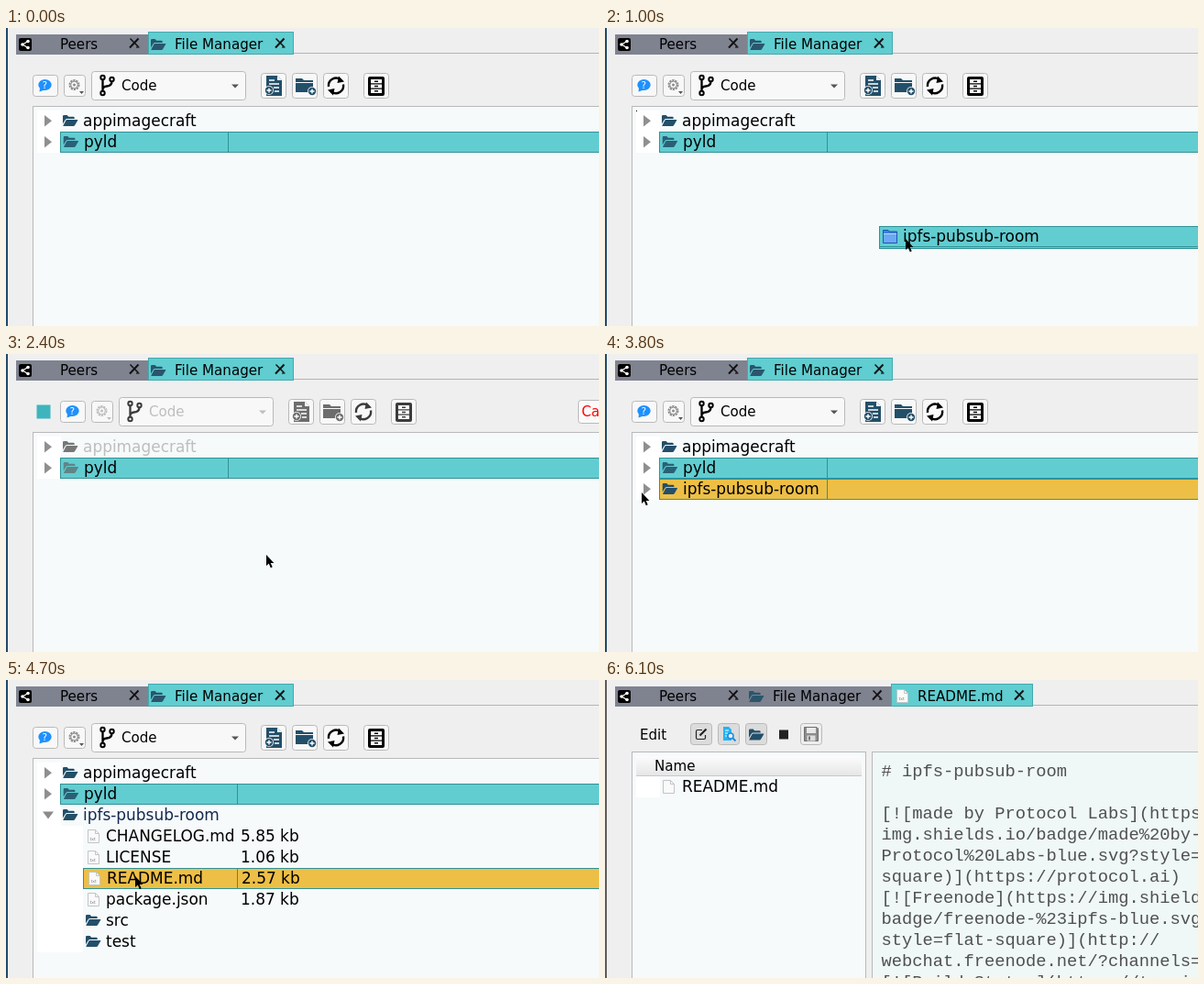
Animation of 647 by 325 pixels, one loop 7100 ms. Source, as an HTML page:

```html
<!DOCTYPE html>
<html lang="en">
<head>
<meta charset="utf-8">
<title>File manager</title>
<style>
html, body { margin: 0; width: 100%; height: 100%; overflow: hidden; background: #efefef; }
svg { display: block; width: 647px; height: 325px; }
text { font-family: "DejaVu Sans", sans-serif; white-space: pre; }
.mono { font-family: "Liberation Mono", monospace; }
</style>
</head>
<body>
<svg id="stage" viewBox="0 0 647 325"></svg>
<script>
const LOOP = 7100;
const TEAL = '#62cdd1', EDGE = '#2f9297', NAVY = '#234f69', GOLD = '#eebf46';
const FRAME = '#b9b9b9', DIM = '#bebebe', PANEL = '#f6fafb', PAPER = '#eff7f7';
const ROW = 16.95, UI = 15.1;

// Hard steps: [start, x, y]
const DRAG = [[400, 585, 310], [500, 535, 300], [600, 485, 286], [700, 435, 270], [800, 385, 252],
  [900, 338, 233], [1000, 299, 216], [1100, 273, 206], [1200, 260, 205], [1300, 255, 205]];
const POINTER = [[1500, 284, 219], [3300, 264, 192], [3500, 190, 178], [3600, 105, 162], [3700, 56, 153],
  [3800, 40, 151], [4200, 44, 150], [4400, 92, 171], [4500, 126, 192], [4700, 141, 214]];
const HOVER = [[0, ''], [3600, 'room'], [4400, 'CHANGELOG.md'], [4500, 'LICENSE'], [4700, 'README.md']];
const SPIN = [[0, 0], [1700, 15], [1800, 30], [1900, 45], [2100, 60], [2200, 75], [2400, 90],
  [5300, 15], [5600, 30], [5800, 45]];
const FILES = [['CHANGELOG.md', '5.85 kb'], ['LICENSE', '1.06 kb'], ['README.md', '2.57 kb'],
  ['package.json', '1.87 kb'], ['src'], ['test']];
const SOURCE = ['# ipfs-pubsub-room', '', '[![made by Protocol Labs](https://',
  'img.shields.io/badge/made%20by-', 'Protocol%20Labs-blue.svg?style=flat-', 'square)](https://protocol.ai)',
  '[![Freenode](https://img.shields.io/', 'badge/freenode-%23ipfs-blue.svg?',
  'style=flat-square)](http://', 'webchat.freenode.net/?channels=', '[![Build Status](https://travis'];

const at = (steps, t) => steps.filter(s => s[0] <= t).pop();
const rect = (x, y, w, h, fill, more = '') => `<rect x="${x}" y="${y}" width="${w}" height="${h}" fill="${fill}" ${more}/>`;
const box = (x, y, w, h, fill, line = FRAME, r = 0) => rect(x + .5, y + .5, w - 1, h - 1, fill, `stroke="${line}" rx="${r}"`);
const path = (d, fill, more = '') => `<path d="${d}" fill="${fill}" ${more}/>`;
const line = (d, color, w = 1) => path(d, 'none', `stroke="${color}" stroke-width="${w}"`);
const disc = (x, y, r, fill) => `<circle cx="${x}" cy="${y}" r="${r}" fill="${fill}"/>`;
const text = (x, y, s, size = ROW, fill = '#000', cls = '') =>
  `<text x="${x}" y="${y}" font-size="${size}" fill="${fill}" class="${cls}">${s}</text>`;
const move = (x, y, s) => `<g transform="translate(${x} ${y})">${s}</g>`;
const button = (x, y, w, h, icon, fill = '#f8f8f8') => box(x, y, w, h, fill, FRAME, 3) + move(x, y, icon);

const folder = (x, y, c = NAVY) => move(x, y,
  path('M0 9.5V1.2Q0 0 1.2 0H4.6L6.2 1.7H11.5Q12.7 1.7 12.7 2.9V4H4.6Q3.3 4 2.6 5.2Z', c) +
  path('M4.7 5H16Q16.6 5 16.2 5.8L13 11.2Q12.6 12 11.6 12H.8Q0 12 .5 11.2L3.4 5.8Q3.8 5 4.7 5Z', c));
const page = (x, y, small = true) => move(x, y,
  path('M.5.5H8.5L12.5 4.5V14.5H.5Z', '#fafafa', 'stroke="#c4c4c4"') + line('M8.5 .5V4.5H12.5', '#c4c4c4') +
  (small ? text(2.5, 12, 'txt', 4.5, '#777') : ''));
const closer = x => line(`M${x + 4.5} 11.5L${x - 5} 21.5`, '#111', 2) + line(`M${x - 4.5} 11.5L${x + 4.5} 20.5`, '#111', 1.5) +
  line(`M${x + 2} 21H${x + 5.5}`, '#111', 1.2);
const plus = (x, y, c) => disc(x, y, 5, '#f8f8f8') + disc(x, y, 4.2, c) +
  line(`M${x - 2.6} ${y}H${x + 2.6}M${x} ${y - 2.6}V${y + 2.6}`, '#fff', 1.4);
const arrow = (x, y) => path(`M${x} ${y}v12l2.8-2.4 2 4.6 1.9-.9-2-4.3h3.7z`, '#000');
const spinner = (y, t) => rect(33.5, y - 7.5, 15, 15, '#3fb4bd', `transform="rotate(${at(SPIN, t)[1]} 41 ${y})"`);

const shareIcon = rect(14, 11, 14, 14, '#000', 'rx="2"') + line('M24 14.5L18 18L24 21.5', '#fff', 1.2) +
  disc(24, 14.5, 1.8, '#fff') + disc(18, 18, 1.8, '#fff') + disc(24, 21.5, 1.8, '#fff');

function tab(x, end, label, tx, icon, active) {
  return (active ? box(x, 4, end - x, 25, '#60cdd0', '#45a9ad') : rect(x, 7, end - x, 22, '#7f8390')) +
    icon + text(tx, 23, label, UI) + closer(end - 15);
}

// Labels sit one pixel further left once the document has loaded.
function tabs(editor, loaded) {
  const dx = loaded ? -1 : 0, mid = 314 + 2 * dx;
  return line(`M${editor ? 467 : 314} 27.5H647`, '#b4b4b4') +
    tab(11, 155, 'Peers', 59, shareIcon, false) +
    tab(155, mid, 'File Manager', 184 + dx, folder(158 + dx, 12, '#2a566d'), !editor) +
    (editor ? tab(mid, 467, 'README.md', 342 + dx, page(319 + dx, 10), true) : '');
}

function toolbar(busy) {
  const c = busy ? '#6d6d6d' : NAVY, ink = busy ? '#3c3c3c' : '#000', soft = busy ? DIM : '#000';
  const cog = busy ? DIM : '#8c8c8c';
  const help = `<ellipse cx="13.5" cy="11" rx="7.2" ry="6" fill="#1e90ff"/>` + path('M8 14L7.5 18.5 13 16.5Z', '#1e90ff') +
    text(10.6, 15, '?', 10.5, '#fff');
  const gear = `<circle cx="11.5" cy="11" r="5" fill="none" stroke="${cog}" stroke-width="2" stroke-dasharray="2.2 .9"/>` +
    `<circle cx="11.5" cy="11" r="3.8" fill="none" stroke="${cog}"/>` +
    disc(11.5, 11, 1.5, cog) + path('M17 18h5l-2.5 3z', busy ? DIM : '#555');
  const branch = line('M12.5 9V22M22.5 11Q22.5 16 17 16.5Q12.5 17 12.5 20', ink, 2.3) +
    [[12.5, 7], [22.5, 9], [12.5, 24]].map(([x, y]) => disc(x, y, 3.2, ink) + disc(x, y, 1.2, '#f8f8f8')).join('');
  const combo = branch + text(33, 21, 'Code', UI, soft) + path('M153 14.5h8l-4 4z', busy ? DIM : '#555');
  const newFile = path('M6 3H18L23 8V25H6Z', c) + path('M18 3V8H23Z', '#f8f8f8') +
    line('M9 8H15M9 12H20M14 16H20M15 20H20', '#fff', 1.5) + plus(9, 19, c);
  const newFolder = path('M4 6H11L13 8H23V21H4Z', c) + line('M4 10.5H23', '#f8f8f8', 1) + plus(22, 20, c);
  const refresh = line('M6 15A8.2 8.2 0 0 1 19 7.3M22 12.5A8.2 8.2 0 0 1 9 20.5', ink, 2.4) +
    path('M17 3.5L23 9.5L15.5 11Z', ink) + path('M11 24.5L5 18.5L12.5 17Z', ink);
  const cabinet = rect(5, 4, 18, 21, ink, 'rx="2"') + rect(8, 7, 12, 15, '#fff') +
    line('M8 11.9H20M8 17.1H20', ink, 1.4) + line('M12 9.3H16M12 14.5H16M12 19.7H16', ink, 1.6);
  return button(29, 51, 28, 24, help) + button(63, 51, 24, 24, gear) + button(93, 47, 169, 32, combo) +
    [[278, newFile], [312, newFolder], [346, refresh], [390, cabinet]].map(([x, i]) => button(x, 49, 28, 28, i)).join('');
}

function bar(x, y, split, fill) {
  return box(x, y, 700 - x, 23, fill, EDGE) + line(`M${split + .5} ${y}V${y + 23}`, EDGE);
}

function folderRow(y, name, o) {
  const twist = o.open ? path(`M40 ${y + 7.5}h12l-6 8z`, '#8b8b8b') : path(`M42 ${y + 5}v12.5l8-6.2z`, '#8f8f8f');
  return rect(34, y, 26, 23, '#fff') + (o.fill ? bar(59, y, o.split, o.fill) : '') + twist +
    folder(62 + (o.fill ? .7 : 0), y + 5, o.icon) + text(o.fill ? 85 : 84, y + 17, name, ROW, o.ink);
}

function fileRow(y, name, size, fill, split) {
  const dx = fill ? 1 : 0;
  return rect(34, y, 50, 23, '#fff') + (fill ? bar(84, y, split, fill) : '') +
    (size ? page(89 + dx, y + 4) + text(256 + dx, y + 17, size) : folder(87, y + 5)) +
    text(109 + dx, y + 17, name);
}

function manager(t) {
  const busy = t >= 1600 && t < 3200, added = t >= 3200, open = t >= 4000, chosen = t >= 5000;
  const hover = at(HOVER, t)[1], split = open ? 252 : 242;
  let s = tabs(false) + (busy ? move(30, 0, toolbar(true)) + spinner(63, t) +
    box(624, 50, 60, 26, '#fafafa', FRAME, 3) + text(628, 68, 'Cancel', UI, '#f00') : toolbar(false));
  s += box(29, 85, 700, 300, PANEL);
  s += folderRow(90, 'appimagecraft', { ink: busy ? DIM : '#000', icon: busy ? '#777' : NAVY });
  s += folderRow(113, 'pyld', { fill: chosen ? '' : TEAL, split, icon: busy ? '#5f8587' : '#2a6076' });
  if (added) s += folderRow(136, 'ipfs-pubsub-room',
    { open, split, fill: hover === 'room' ? GOLD : '', ink: open && hover !== 'room' ? '#14294f' : '#000' });
  if (open) FILES.forEach(([name, size], i) => {
    const fill = hover === name ? (chosen ? TEAL : GOLD) : '';
    s += fileRow(159 + 23 * i, name, size, fill, split);
  });
  if (t >= 400 && t < 1500) s += rect(34, 90, 1, 1, '#000') + dragged(t);
  return s;
}

function dragged(t) {
  const [, x, y] = at(DRAG, t);
  const blue = path('M4.5 4.5H10L11 6H19.5V18.5H4.5Z', '#3f7fdc', 'stroke="#1f56b0"') +
    rect(5, 8, 14, 10, '#6aa8f2') + line('M5 8.5H19', '#b8dbff');
  return move(x, y, box(0, 1, 700, 24, TEAL, EDGE) + box(0, 0, 700, 23, TEAL, EDGE) + blue + text(26, 17, 'ipfs-pubsub-room')) +
    arrow(x + 29, y + 14);
}

function editTools(ready) {
  const c = ready ? '#222' : '#8a8a8a', x = ready ? 93 : 123, down = '#dcdcdc';
  const lens = ready ? '#1c8fdf' : '#888';
  const pen = line('M13 7.5H8Q6.5 7.5 6.5 9V16Q6.5 17.5 8 17.5H15Q16.5 17.5 16.5 16V13', c, 1.2) +
    line('M10.5 13.5L17.5 6.5', c, 2.2);
  const find = path('M6 4H12L15 7V19H6Z', ready ? '#22b4f4' : '#b0b0b0') + line('M8 8H12M8 11H11M8 14H10', '#fff') +
    `<circle cx="14" cy="14" r="3" fill="#eee" stroke="${lens}" stroke-width="1.5"/>` + line('M16.2 16.2L19.5 19.5', lens, 2);
  const save = path('M4.5 4.5H18L19.5 6V19.5H4.5Z', '#8d8d8d', 'stroke="#6e6e6e"') +
    rect(7, 5, 10, 6, '#e8e8e8') + rect(7.5, 13.5, 9, 6, '#ddd') + rect(9, 14.5, 2, 4, '#777');
  return text(ready ? 38 : 68, 65, 'Edit', UI, ready ? '#000' : DIM) + button(x, 47, 24, 24, pen, down) +
    (ready ? button(123, 47, 24, 24, find, down) + button(153, 47, 24, 24, '', down) + rect(190, 54.5, 10, 10, '#222')
      : move(153, 47, find)) +
    folder(ready ? 157 : 187, 53.5, ready ? NAVY : '#777') + button(213, 47, 24, 24, save, ready ? '#eee' : '#e2e2e2');
}

const loading = t => tabs(true) + spinner(59, t) + editTools(false) + box(29, 78, 700, 300, PAPER);

function reading() {
  const shade = '<linearGradient id="shade" x2="0" y2="1"><stop stop-color="#fcfcfc"/><stop offset="1" stop-color="#e6e6e6"/></linearGradient>';
  return tabs(true, true) + editTools(true) +
    box(29, 78, 256, 300, PANEL) + shade + rect(34, 83, 246, 21, 'url(#shade)') + line('M34 104.5H280', '#c9c9c9') +
    text(54, 99, 'Name', UI) + rect(34, 105, 26, 23, '#fff') + page(63, 109, false) + text(84, 122, 'README.md') +
    box(291, 78, 500, 300, PAPER) +
    SOURCE.map((s, i) => text(301.5, 105 + 23 * i, s, 18.75, '#505050', 'mono')).join('');
}

function picture(t) {
  let s = rect(0, 0, 647, 325, '#efefef') + rect(0, 0, 2, 325, t < 6100 ? '#1f4a6c' : '#5c5d60');
  s += t < 5300 ? manager(t) : t < 6100 ? loading(t) : reading();
  const p = at(POINTER, t);
  return p && t < 6100 ? s + arrow(p[1], p[2]) : s;
}

const stage = document.getElementById('stage');
const start = performance.now();
let shown = -1;
function tick() {
  const t = Math.floor((performance.now() - start) % LOOP / 100) * 100;
  if (t !== shown) stage.innerHTML = picture(shown = t);
  requestAnimationFrame(tick);
}
tick();
</script>
</body>
</html>
```
